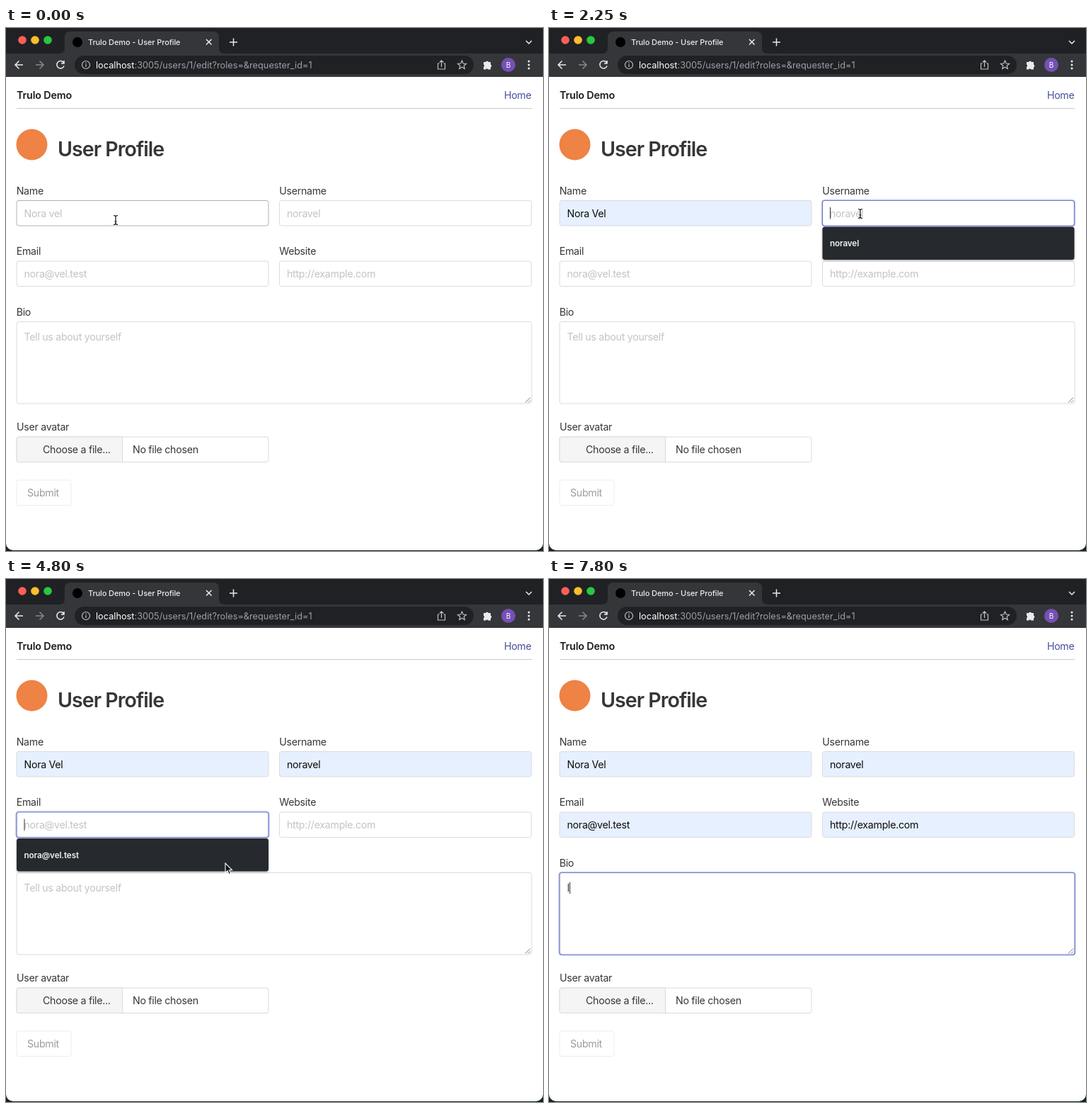
An HTML page for the animation above (8 s loop, 759 by 738 pixels).

```html
<!DOCTYPE html>
<html lang="en">
<head>
<meta charset="utf-8">
<title>Form autofill</title>
<style>
html, body { margin: 0; width: 100%; height: 100%; overflow: hidden; background: #202124; }
svg { display: block; width: 100%; height: 100%; }
text { font: 14.2px Inter, "Open Sans", sans-serif; letter-spacing: -.02em; fill: #363636; font-optical-sizing: none; }
.heading { font-size: 28.6px; font-weight: 600; letter-spacing: -.034em; }
.brand { font-size: 14.3px; font-weight: 600; letter-spacing: -.01em; fill: #1c1c1c; }
.tab { font-size: 11px; font-weight: 500; letter-spacing: -.01em; fill: #e8eaed; }
.url { font-size: 12.75px; letter-spacing: 0; fill: #9aa0a6; }
.initial { font-size: 10px; fill: #fff; text-anchor: middle; }
.option { font-size: 11.7px; font-weight: 600; letter-spacing: -.01em; fill: #f1f1f1; }
.icon { fill: none; stroke: #e8eaed; stroke-width: 1.5; }
</style>
</head>
<body>
<svg viewBox="0 0 759 738">
  <defs>
    <filter id="shadow" x="-5%" y="-20%" width="110%" height="150%">
      <feDropShadow dx="0" dy="1" stdDeviation="1.5" flood-opacity=".35"/>
    </filter>
  </defs>

  <!-- Browser window -->
  <rect width="759" height="738" fill="#15251a"/>
  <rect width="759" height="737" rx="10" fill="#fff"/>
  <rect width="759" height="69" fill="#35363a"/>
  <path d="M0 0H759V36H309q-8 0-8-8V13q0-8-8-8H91q-8 0-8 8V28q0 8-8 8H0z" fill="#202124"/>
  <circle cx="23" cy="17" r="5.8" fill="#fe5f57"/>
  <circle cx="41" cy="17" r="5.8" fill="#febc2e"/>
  <circle cx="59" cy="17" r="5.8" fill="#28c840"/>
  <circle cx="101" cy="20" r="7" fill="#000"/>
  <text class="tab" x="116" y="24">Trulo Demo - User Profile</text>
  <rect x="97" y="39" width="564" height="26" rx="13" fill="#202124"/>
  <g class="icon">
    <path d="M283 16l7.5 7.5m0-7.5l-7.5 7.5M316 20h11m-5.5-5.5v11M735 18l4 4 4-4"/>
    <path d="M24 52H13m5.5-5.5L13 52l5.5 5.5"/>
    <path d="M42 52h11m-5.5-5.5L53 52l-5.5 5.5" stroke="#85888c"/>
    <path d="M81.5 49a5.2 5.2 0 1 0 .5 4.5M82 46v4h-4"/>
    <g stroke="#bdc1c6" stroke-width="1.2">
      <circle cx="113" cy="52" r="5.5"/>
      <path d="M113 51v4m0-6.5v1.4M612.5 50h-2v8h10v-8h-2M615.5 55v-9m-2.7 2.5l2.7-2.7 2.7 2.7"/>
      <path d="M644.5 46l1.7 4 4.3.4-3.3 2.8 1 4.2-3.7-2.2-3.7 2.2 1-4.2-3.3-2.8 4.3-.4z"/>
    </g>
  </g>
  <text class="url" x="127" y="56.5"><tspan fill="#fff">localhost</tspan>:3005/users/1/edit?roles=&amp;requester_id=1</text>
  <path d="M675 48h3a2.2 2.2 0 0 1 4 0h3v3.5a2.2 2.2 0 0 1 0 4V58.5h-3.5a2 2 0 0 0-3.5 0h-3v-3.5a2 2 0 0 0 0-3.5z" fill="#e8eaed"/>
  <circle cx="710" cy="52" r="10" fill="#7650b5"/>
  <text class="initial" x="710" y="55.6">B</text>
  <g fill="#e8eaed"><circle cx="739" cy="47" r="1.5"/><circle cx="739" cy="52" r="1.5"/><circle cx="739" cy="57" r="1.5"/></g>

  <!-- Page -->
  <text class="brand" x="15" y="100">Trulo Demo</text>
  <text x="742.5" y="100" text-anchor="end" style="fill:#485199">Home</text>
  <path d="M15 113.5H743" stroke="#c9c9c9"/>
  <circle cx="36.5" cy="164.5" r="22" fill="#ef8245"/>
  <text class="heading" x="73" y="181.3">User Profile</text>
  <g id="form"></g>
  <text x="15" y="568">User avatar</text>
  <rect x="15" y="577" width="356" height="35.5" rx="3" fill="#fff" stroke="#dbdbdb"/>
  <path d="M164.5 577V612.5H18q-3 0-3-3V580q0-3 3-3z" fill="#f5f5f5" stroke="#dbdbdb"/>
  <text x="52" y="600">Choose a file...</text>
  <text x="179" y="600">No file chosen</text>
  <rect x="15" y="638" width="77" height="35.5" rx="3" fill="#fff" stroke="#ededed"/>
  <text x="30" y="661" style="fill:#9b9b9b">Submit</text>
  <path d="M734 528.5l7-7m-3 7l3-3" stroke="#777"/>
  <g id="popups"></g>
  <g id="pointer">
    <path id="arrow" d="M0 0V13.5l3.1-2.9 2.2 5 2.3-1-2.2-4.8H9.6z" fill="#111" stroke="#fff" stroke-width="1.1"/>
    <g id="beam" fill="none">
      <path d="M-3-6.5q3 0 3 2.2V4.3q0 2.200-3 2.2M3-6.5q-3 0-3 2.2V4.3q0 2.2 3 2.2M-1.5 2h3" stroke="#fff" stroke-width="2.6" opacity=".6"/>
      <path d="M-3-6.5q3 0 3 2.2V4.3q0 2.200-3 2.2M3-6.5q-3 0-3 2.2V4.3q0 2.2 3 2.2M-1.5 2h3" stroke="#111" stroke-width="1.2"/>
    </g>
  </g>
</svg>
<script>
const LOOP = 8000, TYPED = 7550;
const $ = id => document.getElementById(id);
const show = (node, on) => { node.style.display = on ? '' : 'none'; };

// Times: open (focus), mark (option highlighted), pick (value accepted), blur
const fields = [
  { label: 'Name', hint: 'Nora vel', value: 'Nora Vel', x: 15, y: 243.5, open: 1050, mark: 1450, pick: 1700, blur: 2200 },
  { label: 'Username', hint: 'noravel', value: 'noravel', x: 386.5, y: 243.5, open: 2200, mark: 2650, pick: 2950, blur: 3500, misspelt: true },
  { label: 'Email', hint: 'nora@vel.test', value: 'nora@vel.test', x: 15, y: 329, open: 3500, mark: 4850, pick: 5150, blur: 5800 },
  { label: 'Website', hint: 'http://example.com', value: 'http://example.com', x: 386.5, y: 329, open: 5800, mark: 6300, pick: 6600, blur: 6950 },
  { label: 'Bio', hint: 'Tell us about yourself', value: 'I', x: 15, y: 414.5, w: 728, h: 115.5, open: 6950, pick: TYPED, blur: LOOP, blink: 6700, plain: true }
];

// Pointer hotspot: time, x, y
const path = [
  [0, 155, 271], [1150, 155, 271], [1550, 164, 296], [1800, 164, 296],
  [2050, 440, 262], [2500, 440, 262], [2780, 449, 302], [2950, 449, 302],
  [3400, 297.5, 340], [3950, 297.5, 340], [4150, 283, 471], [4300, 283, 471],
  [4350, 283, 480], [4450, 283, 480], [4800, 310, 401], [5000, 314, 393],
  [5150, 314, 393], [5650, 470, 352], [6100, 470, 352], [6400, 480, 390],
  [6600, 480, 390], [6900, 418, 475], [LOOP, 418, 475]
];

function add(parent, tag, attrs, content = '') {
  const node = document.createElementNS('http://www.w3.org/2000/svg', tag);
  for (const key in attrs) node.setAttribute(key, attrs[key]);
  node.textContent = content;
  return parent.appendChild(node);
}

for (const f of fields) {
  f.w ??= 356;
  f.h ??= 35.5;
  const { x, y, w, h } = f, form = $('form');
  add(form, 'text', { x: x - .3, y: y - 8.8 }, f.label);
  f.halo = add(form, 'rect', { x: x - .5, y: y - .5, width: w + 1, height: h + 1, rx: 4, fill: 'none', stroke: '#d0d6f4', 'stroke-width': 3 });
  f.box = add(form, 'rect', { x, y, width: w, height: h, rx: 3 });
  f.text = add(form, 'text', { x: x + 10.5 });
  f.squiggle = add(form, 'path', { fill: 'none', stroke: '#e0342b', 'stroke-width': 1.6, 'stroke-dasharray': '1.6 1.4' });
  f.caret = add(form, 'path', { stroke: '#333' });
  f.popup = add($('popups'), 'g', {});
  if (f.plain) continue;
  add(f.popup, 'rect', { x, y: y + 37, width: w, height: 46.5, rx: 3.5, fill: '#282b2d', filter: 'url(#shadow)' });
  f.option = add(f.popup, 'rect', { x, y: y + 43.5, width: w, height: 33.5, fill: '#414142' });
  add(f.popup, 'text', { x: x + 10.5, y: y + 64.7, class: 'option' }, f.value);
}

function pointerAt(t) {
  const i = path.findIndex(p => p[0] > t);
  const [t0, x0, y0] = path[i - 1], [t1, x1, y1] = path[i];
  const u = (t - t0) / (t1 - t0), e = u * u * (3 - 2 * u);
  return [x0 + (x1 - x0) * e, y0 + (y1 - y0) * e];
}

function drawField(f, t, hover) {
  const focus = t >= f.open && t < f.blur;
  const picked = t >= f.pick;
  const preview = !picked && t >= f.mark;
  const filled = picked || preview;
  show(f.halo, focus);
  f.box.setAttribute('fill', filled && !f.plain ? '#e6f0ff' : '#fff');
  f.box.setAttribute('stroke', focus ? '#6a76c6' : hover ? '#b0b0b0' : '#dbdbdb');
  f.box.setAttribute('stroke-width', focus ? 1.2 : 1);

  f.text.textContent = filled ? f.value : f.hint;
  f.text.style.fill = filled ? (f.plain ? '#363636' : '#0c0c0c') : '#c3c3c3';
  f.text.style.fontSize = preview ? '11.6px' : '';
  const baseline = f.y + (f.plain ? 26.6 : 23);
  f.text.setAttribute('y', baseline);

  const length = picked ? f.text.getComputedTextLength() : 0;
  const end = f.x + 11 + length;
  show(f.squiggle, f.misspelt && focus && picked);
  f.squiggle.setAttribute('d', `M${f.x + 10.5} ${baseline + 2.3}H${end}`);
  const start = picked ? f.pick : f.blink ?? f.open;
  show(f.caret, focus && !preview && (t - start) % 1000 < 500);
  f.caret.setAttribute('d', `M${end} ${baseline - 13.5}v16.5`);

  show(f.popup, !f.plain && focus && !picked);
  if (f.option) show(f.option, preview);
}

function draw(t) {
  const [x, y] = pointerAt(t);
  const covered = fields.some(f => !f.plain && t >= f.open && t < f.pick &&
    x >= f.x && x <= f.x + f.w && y >= f.y + 37 && y <= f.y + 83.5);
  let overField = false;
  for (const f of fields) {
    const hover = !covered && t < TYPED && x >= f.x && x <= f.x + f.w && y >= f.y && y <= f.y + f.h;
    overField ||= hover;
    drawField(f, t, hover);
  }
  $('pointer').setAttribute('transform', `translate(${x} ${y})`);
  show($('pointer'), t < TYPED);
  show($('beam'), overField);
  show($('arrow'), !overField);
}

const began = performance.now();
function tick() {
  draw((performance.now() - began) % LOOP);
  requestAnimationFrame(tick);
}
tick();
</script>
</body>
</html>
```
